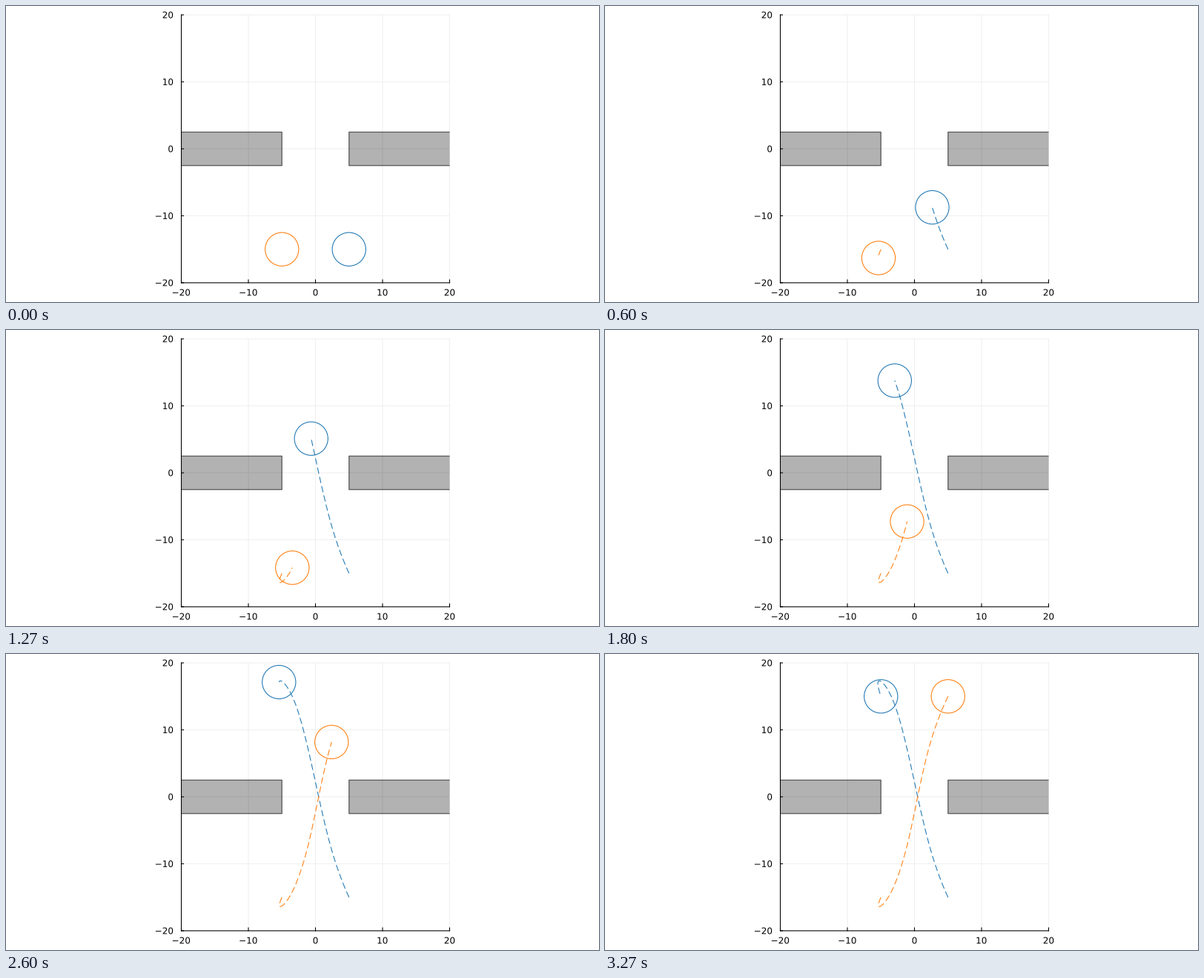
Animation, 800 px wide and 400 px high, one loop 3.34 s. Source, as a matplotlib script:

```python
import numpy as np
import matplotlib.pyplot as plt
from matplotlib.animation import FuncAnimation
from matplotlib.patches import Circle, PathPatch, Rectangle
from matplotlib.path import Path
from matplotlib.textpath import TextPath

WIDTH, HEIGHT, DPI = 800, 400, 100
LINE = 16 / 15 * 72 / DPI          # basic line weight in points
SCALE, CX, CY = 9.05, 417.5, 193   # world units to pixels
STEPS, TICK_MS, LOOP_MS = 50, 10, 3340
BLUE, ORANGE = "#1f77b4", "#ff7f0e"

# waypoints of the two agents, passed at the same moments
MOMENTS = np.array([0, 9, 19, 27, 39, 49])
BLUE_WAY = [(5, -15), (2.65, -8.74), (-0.64, 5.11),
            (-2.95, 13.77), (-5.44, 17.13), (-5, 15)]
ORANGE_WAY = [(-5, -15), (-5.36, -16.3), (-3.45, -14.17),
              (-1.1, -7.27), (2.4, 8.18), (5, 15)]

plt.rcParams["font.family"] = "DejaVu Sans"
plt.rcParams["path.snap"] = False


def to_px(x, y):
    return CX + SCALE * x, CY - SCALE * y


LEFT, BOTTOM = to_px(-20, -20)
RIGHT, TOP = to_px(20, 20)


def spline(t, points, at):
    """Smooth path through the points that starts and ends at rest."""
    h = np.diff(t)[:, None]
    slope = np.diff(points, axis=0) / h
    system, rhs = np.eye(len(t)), np.zeros_like(points)
    for k in range(1, len(t) - 1):
        a, b = 1 / h[k - 1, 0], 1 / h[k, 0]
        system[k, k - 1:k + 2] = a, 2 * (a + b), b
        rhs[k] = 3 * (slope[k - 1] * a + slope[k] * b)
    speed = np.linalg.solve(system, rhs)
    k = np.clip(np.searchsorted(t, at, side="right") - 1, 0, len(h) - 1)
    s = (at - t[k])[:, None] / h[k]
    ease = s * s * (3 - 2 * s)
    bend = s * (1 - s) * h[k] * ((1 - s) * speed[k] - s * speed[k + 1])
    return points[k] * (1 - ease) + points[k + 1] * ease + bend


fig = plt.figure(figsize=(WIDTH / DPI, HEIGHT / DPI), dpi=DPI, facecolor="white")
ax = fig.add_axes([0, 0, 1, 1])
ax.set(xlim=(0, WIDTH), ylim=(HEIGHT, 0))
ax.axis("off")


def stroke(xs, ys, color="black", width=1.0, **kw):
    return ax.plot(xs, ys, color=color, lw=width * LINE, **kw)[0]


def draw_label(x, baseline, text, anchor):
    """Outlined text; anchor is the share of its width left of x."""
    glyphs = TextPath((0, 0), text, size=12)
    box = glyphs.get_extents()
    shift = x - box.x0 - anchor * box.width
    outline = Path(glyphs.vertices * [1, -1] + [shift, baseline], glyphs.codes)
    ax.add_patch(PathPatch(outline, fc="black", lw=0))


def draw_axes():
    for value in range(-20, 21, 10):
        x, y = to_px(value, value)
        text = str(value).replace("-", "\u2212")
        stroke([x, x], [TOP, BOTTOM], "#f0f0f0", zorder=1)
        stroke([LEFT, RIGHT], [y, y], "#f0f0f0", zorder=1)
        stroke([x, x], [BOTTOM, BOTTOM - 4], zorder=3)
        stroke([LEFT, LEFT + 3], [y, y], zorder=3)
        draw_label(x, 391.4, text, 0.5)
        draw_label(225.2, y + 4.4, text, 1)
    stroke([LEFT, LEFT, RIGHT], [TOP, BOTTOM, BOTTOM], zorder=3)


def draw_wall(inner, outer):
    x, top = to_px(inner, 2.5)
    _, bottom = to_px(inner, -2.5)
    ax.add_patch(Rectangle((min(x, outer), top), abs(outer - x), bottom - top,
                           fc="black", alpha=0.3, lw=0, zorder=2))
    stroke([outer, x, x, outer], [top, top, bottom, bottom], width=1.3,
           alpha=0.55, solid_capstyle="butt", zorder=2)


class Agent:
    def __init__(self, way, color):
        path = spline(MOMENTS, np.array(way, float), np.arange(STEPS))
        self.xs, self.ys = to_px(*path.T)
        self.body = ax.add_patch(Circle((0, 0), 2.5 * SCALE, fill=False,
                                        ec=color, lw=LINE, zorder=4))
        self.trail = stroke([], [], color, linestyle=(0, (8, 4)),
                            dash_capstyle="butt", zorder=4)

    def show(self, step):
        self.body.center = self.xs[step], self.ys[step]
        self.trail.set_data(self.xs[:step + 1], self.ys[:step + 1])
        return self.body, self.trail


draw_axes()
draw_wall(-5, LEFT)
draw_wall(5, RIGHT)
agents = [Agent(BLUE_WAY, BLUE), Agent(ORANGE_WAY, ORANGE)]


def update(tick):
    # 15 steps per second, with hold times rounded to 10 ms
    step = min(int((tick + 0.5) * 0.15), STEPS - 1)
    return [artist for agent in agents for artist in agent.show(step)]


anim = FuncAnimation(fig, update, frames=LOOP_MS // TICK_MS, interval=TICK_MS,
                     repeat=True, repeat_delay=0, blit=False)
plt.show()
```
